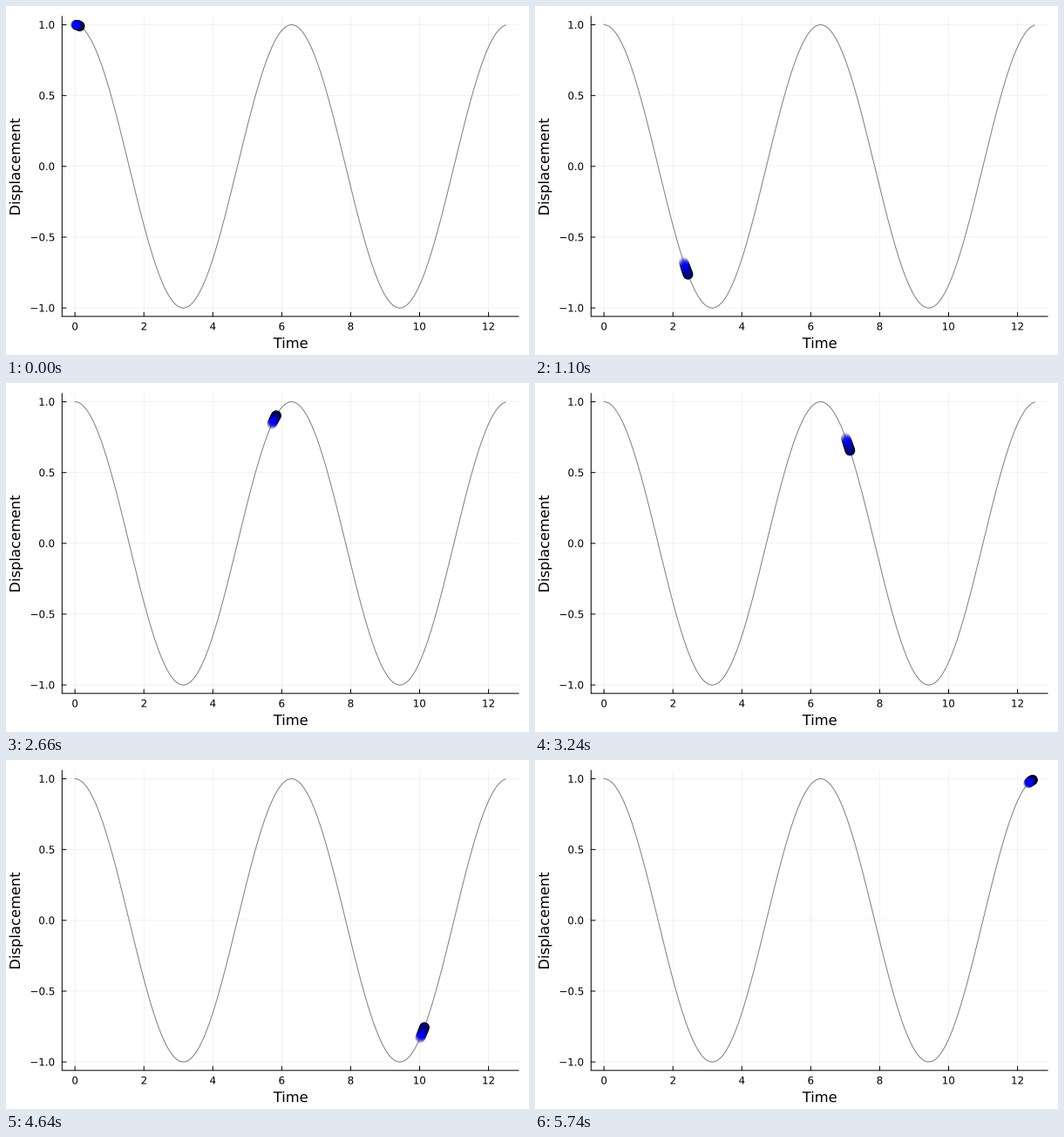
These frames come from a looping animation (600 by 400 pixels, 5760 ms). A matplotlib script:

```python
import numpy as np
import matplotlib.pyplot as plt
from matplotlib.animation import FuncAnimation
from matplotlib.patches import PathPatch
from matplotlib.textpath import TextPath
from matplotlib.transforms import Affine2D

W, H, DPI = 600, 400, 100
PT = 72 / DPI                       # points per pixel
LEFT, RIGHT, TOP, BOTTOM = 64.3, 588.19, 11.81, 355.8
T_END, PAD = 12.5, 0.03
STEP, TAIL = 10, 15                 # samples per pose, markers in the trail
RADIUS, STROKE = 5.4, 0.8
TICK, TICK_SIZE, LABEL_SIZE = 4.72, 11.85, 16.3

plt.rcParams["font.family"] = "DejaVu Sans"


def px(t):
    scale = (RIGHT - LEFT) / (T_END * (1 + 2 * PAD))
    return LEFT + (t + T_END * PAD) * scale


def py(y):
    scale = (BOTTOM - TOP) / (2 * (1 + 2 * PAD))
    return (TOP + BOTTOM) / 2 - y * scale


fig = plt.figure(figsize=(W / DPI, H / DPI), dpi=DPI, facecolor="white")
ax = fig.add_axes([0, 0, 1, 1])
ax.axis("off")


def line(xs, ys, width=1.0, z=2, color="black", alpha=1):
    ax.plot(xs, ys, lw=width * PT, zorder=z, color=color, alpha=alpha,
            snap=False, solid_capstyle="round")


def label(x, y, text, size, align=0.5, angle=0):
    """Text on baseline y; align is the fraction of its width left of x."""
    path = TextPath((0, 0), text, size=size)
    box = path.get_extents()
    place = (Affine2D().translate(-box.x0 - align * box.width, 0)
             .rotate_deg(angle).scale(1, -1).translate(x, y))
    ax.add_patch(PathPatch(place.transform_path(path), fc="black", lw=0,
                           snap=False))


# Grid, ticks and tick labels
for t in range(0, 13, 2):
    x = px(t)
    line([x, x], [TOP, BOTTOM], 0.5, 1, alpha=0.1)
    line([x, x], [BOTTOM, BOTTOM - TICK])
    label(x, 371.4, str(t), TICK_SIZE)
for v in np.linspace(-1, 1, 5):
    y = py(v)
    line([LEFT, RIGHT], [y, y], 0.5, 1, alpha=0.1)
    line([LEFT, LEFT + TICK], [y, y])
    label(LEFT - 9, y + 4.32, f"{v:.1f}".replace("-", "\u2212"), TICK_SIZE, 1)

line([LEFT, LEFT], [TOP, BOTTOM])
line([LEFT, RIGHT], [BOTTOM, BOTTOM])
label((LEFT + RIGHT) / 2, 392, "Time", LABEL_SIZE)
label(16, (TOP + BOTTOM) / 2, "Displacement", LABEL_SIZE, angle=90)

# Oscillation curve
time = np.arange(0, T_END + 0.005, 0.01)
curve = np.column_stack([px(time), py(np.cos(time))])
line(curve[:, 0], curve[:, 1], 1, 3, "#7f7f7f")

# Trail: opaque head drawn first, fading markers stacked over it
order = np.arange(TAIL)[::-1]
fade = order / (TAIL - 1)
fill = np.zeros((TAIL, 4))
fill[:, 2], fill[:, 3] = 1, fade
edge = np.zeros((TAIL, 4))
edge[:, 3] = fade
trail = ax.scatter(*curve[order].T, s=(2 * RADIUS * PT) ** 2, facecolors=fill,
                   edgecolors=edge, linewidths=STROKE * PT, zorder=4)

ax.set_xlim(0, W)
ax.set_ylim(H, 0)


def update(n):
    # Poses are held 20, 100 and 20 ms in turn
    cycle, tick = divmod(n, 7)
    pose = 3 * cycle + (tick >= 1) + (tick >= 6)
    trail.set_offsets(curve[STEP * pose + order])
    return (trail,)


anim = FuncAnimation(fig, update, frames=288, interval=20, repeat=True,
                     repeat_delay=0, blit=True)
plt.show()
```
